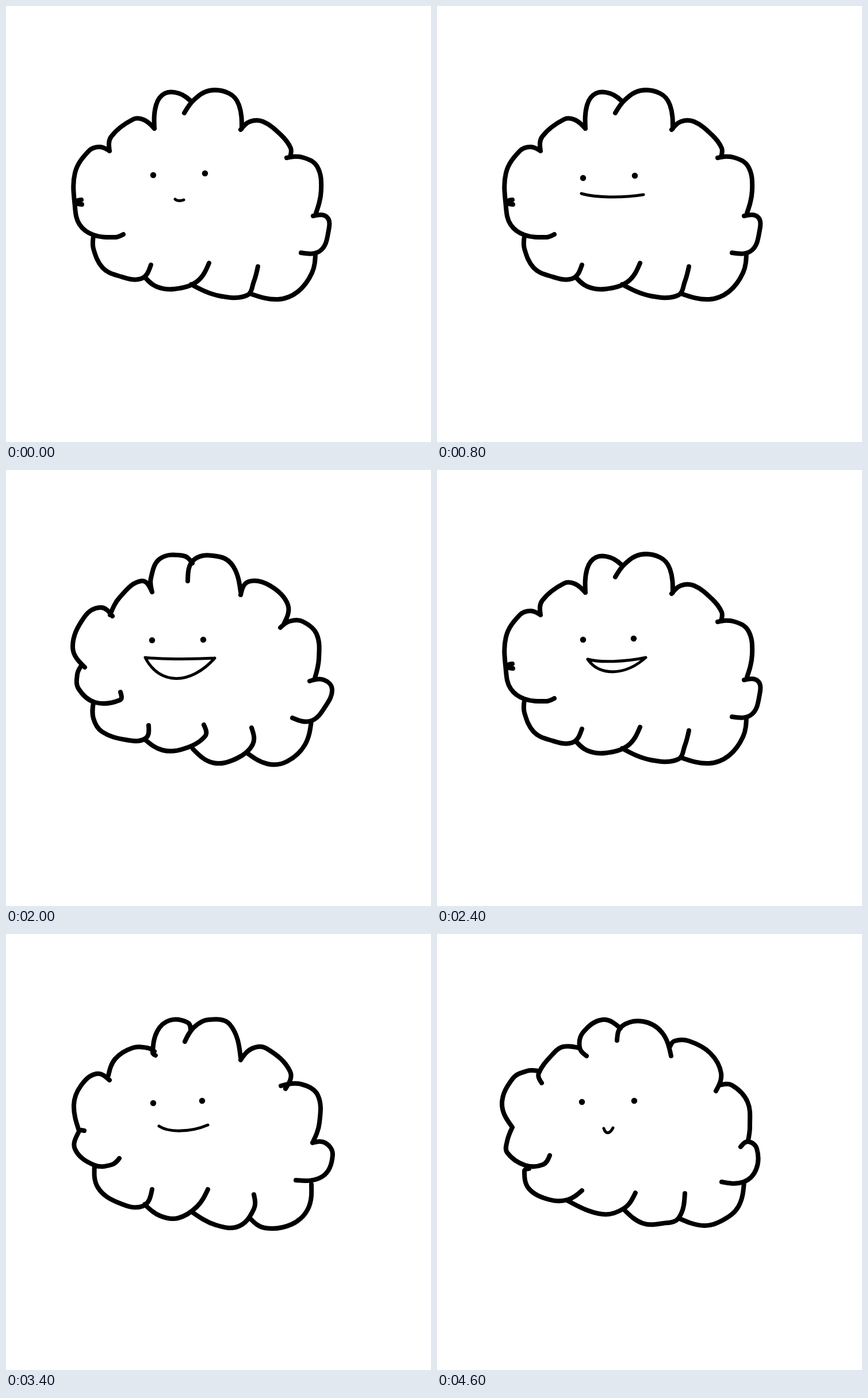
An HTML page that plays this animation: 739 px wide and 758 px high, repeating every 4800 ms.

```html
<!DOCTYPE html>
<html lang="en">
<head>
<meta charset="utf-8">
<title>Cloud</title>
<style>
  html, body { margin: 0; width: 100%; height: 100%; overflow: hidden; background: #fff; }
  svg { display: block; width: 100%; height: 100%; }
  path { fill: none; stroke: #000; stroke-linecap: round; stroke-linejoin: round; }
  #body { stroke-width: 8; }
  #eyes { stroke-width: 10.5; }
  #mouth { stroke-width: 5; }
</style>
</head>
<body>
<svg viewBox="0 0 739 758">
  <path id="body"/>
  <path id="eyes"/>
  <path id="mouth"/>
</svg>
<script>
const LOOP = 4800;
const BODY_STEP = 200;

const mix = (a, b, k) => a + (b - a) * k;

// Smooth curve through a few points; handles follow the neighbours' direction.
function spline(text) {
  const pts = text.trim().split(/\s+/).map(p => p.split(',').map(Number));
  const last = pts.length - 1;
  const handle = (i, sign, reach) => {
    const [ax, ay] = pts[i - 1], [bx, by] = pts[i + 1];
    const k = sign * reach * 0.36 / Math.hypot(bx - ax, by - ay);
    return [pts[i][0] + (bx - ax) * k, pts[i][1] + (by - ay) * k];
  };
  const halfway = (p, q) => p.map((v, i) => mix(v, q[i], 0.5));
  let d = 'M' + pts[0];
  for (let i = 0; i < last; i++) {
    const p = pts[i], q = pts[i + 1];
    const reach = Math.hypot(q[0] - p[0], q[1] - p[1]);
    let out = i > 0 && handle(i, 1, reach);
    let into = i + 1 < last && handle(i + 1, -1, reach);
    out ||= halfway(p, into);
    into ||= halfway(q, out);
    d += `C${out} ${into} ${q}`;
  }
  return d;
}

// One pen stroke per line.
const cloud = text => text.split('\n').map(spline).join('');

const plump = cloud(`258,213 261,172 276,152 301,152 323,167
  310,186 327,163 354,147 388,152 405,172 410,213
  408,215 424,201 447,201 478,224 495,247 494,262
  488,264 515,263 541,279 548,320 538,363
  534,365 558,367 561,390 547,425 513,429
  538,430 532,464 507,497 473,510 427,501
  438,453 431,479 419,503 371,504 322,484
  353,447 332,479 293,492 262,488 241,471
  252,450 235,474 195,469 168,455 152,422 152,400
  204,397 190,402 152,398 128,380 120,350 120,290 144,252 163,245 180,252
  131,337 123,341 132,345
  180,252 183,227 221,197 240,198 258,213`);

const round = cloud(`260,211 255,206 263,169 285,150 316,154 321,168
  311,187 327,162 352,149 389,157 408,215
  408,219 428,199 453,199 494,239 486,269
  478,264 513,261 542,280 545,328 533,363
  533,363 555,363 568,384 551,421 504,428
  531,435 525,478 496,505 450,511 424,494
  431,453 431,478 405,508 365,506 323,483
  351,444 332,474 299,494 268,490 241,470
  254,444 238,473 195,467 160,441 154,402
  197,390 184,401 154,402 120,374 127,343 136,342
  127,342 118,297 130,264 157,243 180,254
  178,246 190,217 220,198 246,198 258,204`);

const curly = cloud(`254,212 252,188 268,154 308,149 324,162
  316,193 328,155 372,151 396,169 408,212
  408,217 422,194 459,201 490,234 483,268
  477,274 493,263 515,263 540,285 544,328 537,362
  528,367 553,365 567,381 556,410 531,436 498,431
  531,436 519,479 488,507 455,511 418,491
  427,448 429,477 400,502 360,509 325,485
  344,443 346,463 308,485 272,487 241,468
  248,444 242,467 208,469 167,455 152,432 152,404
  199,386 198,400 155,404 126,380 124,355 131,340
  137,343 116,308 136,256 164,239 185,254
  181,252 198,221 235,193 254,212`);

const slim = cloud(`260,212 248,197 254,171 288,149 319,164
  313,185 322,160 358,152 391,171 407,212
  405,196 413,186 438,186 475,207 494,242 485,273
  491,263 513,263 540,292 544,335 541,359
  528,370 541,361 556,373 555,409 533,431 495,431
  534,431 524,474 496,498 464,507 420,494
  431,451 420,494 393,503 358,503 326,480
  345,450 325,477 287,487 226,463
  252,446 227,462 196,462 160,443 152,412 160,408
  196,385 184,401 153,402 122,380 122,360 131,336
  131,336 113,295 132,251 157,238 175,238
  182,259 177,242 203,207 219,196 247,198`);

const bodies = [plump, round, curly, slim];

// Key faces: start, eye centres, mouth corners, sag of upper and lower lip.
const keys = [
  { at: 0, eyes: [256, 294, 346, 291], lips: [294, 336, 309, 337, 2, 2] },
  { at: 640, eyes: [254, 299, 344, 295], lips: [251, 326, 359, 328, 5, 5] },
  { at: 1800, eyes: [254, 296, 343, 295], lips: [242, 326, 363, 327, 2, 36] },
  { at: 2360, eyes: [254, 295, 342, 293], lips: [262, 329, 363, 326, 5, 23] },
  { at: 3240, eyes: [256, 294, 341, 290], lips: [266, 334, 351, 332, 9, 9] },
  { at: 3720, eyes: [255, 294, 342, 291], lips: [283, 334, 316, 337, 11, 11] },
  { at: 4520, eyes: [252, 292, 343, 290], lips: [290, 338, 306, 337, 8, 8] }
];

// Times at which the face is redrawn.
const redraws = [0, 120, 320, 640, 920, 1240, 1600, 1800, 2080, 2360, 2600, 2920, 3240, 3480, 3720, 4080, 4520];

function faceAt(t) {
  const i = keys.findLastIndex(k => k.at <= t);
  const a = keys[i], b = keys[i + 1] || a;
  const k = a === b ? 0 : (t - a.at) / (b.at - a.at);
  const blend = name => a[name].map((v, j) => mix(v, b[name][j], k));
  return { eyes: blend('eyes'), lips: blend('lips') };
}

const eyePath = ([lx, ly, rx, ry]) => `M${lx} ${ly}h.01M${rx} ${ry}h.01`;

function mouthPath([x0, y0, x1, y1, upper, lower]) {
  const control = (k, sag) => `${mix(x0, x1, k)} ${mix(y0, y1, k) + sag * 4 / 3}`;
  const lip = sag => `M${x0} ${y0}C${control(0.2, sag)} ${control(0.65, sag)} ${x1} ${y1}`;
  return lip(upper) + lip(lower);
}

const draw = (id, d) => document.getElementById(id).setAttribute('d', d);

function render(now) {
  const t = now % LOOP;
  const face = faceAt(redraws.findLast(start => start <= t));
  draw('body', bodies[Math.floor(t / BODY_STEP) % bodies.length]);
  draw('eyes', eyePath(face.eyes));
  draw('mouth', mouthPath(face.lips));
}

let origin;
function tick(now) {
  origin ??= now;
  render(Math.max(0, now - origin));
  requestAnimationFrame(tick);
}
render(0);
requestAnimationFrame(tick);
</script>
</body>
</html>
```
